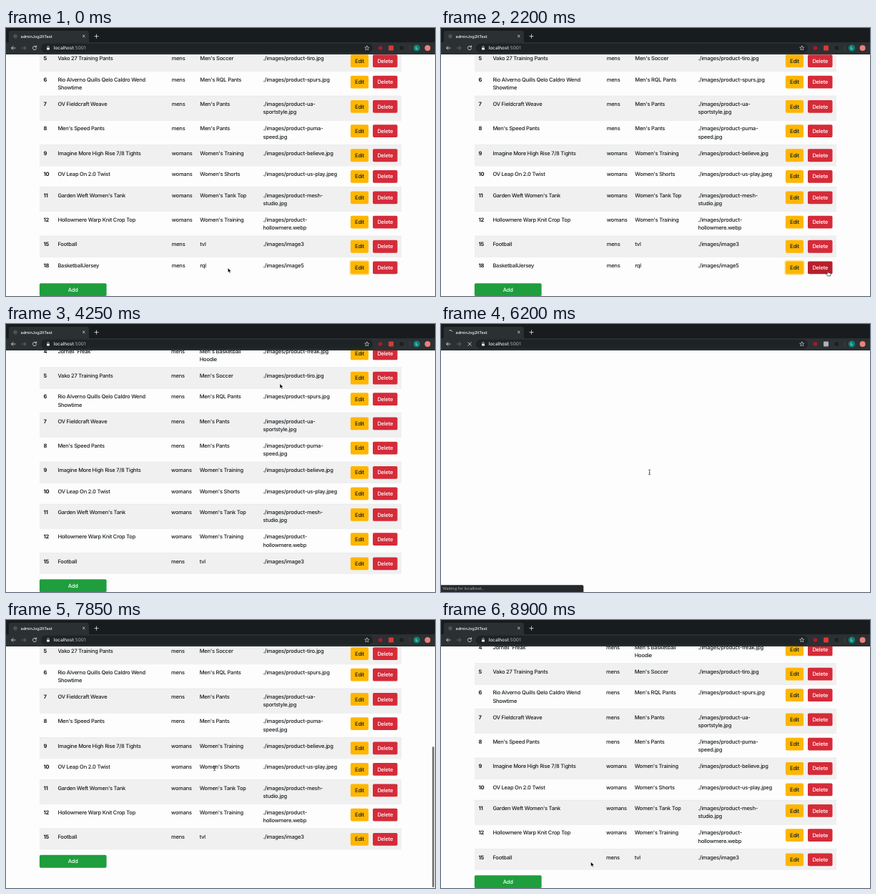
An HTML page that plays this animation: 600x375 px, repeating every 8.95 s.

```html
<!DOCTYPE html>
<html lang="en">
<head>
<meta charset="utf-8">
<title>adminJog2ItTest</title>
<style>
  html, body { margin: 0; width: 100%; height: 100%; overflow: hidden; background: #fdfdfd; }
  svg { display: block; width: 100%; height: 100%; }
  text { font: 450 7.5px Inter, "Open Sans", sans-serif; letter-spacing: -.21px; fill: #171b1e; text-rendering: geometricPrecision; white-space: pre; }
  .bold { font-weight: 700; }
  .mid { text-anchor: middle; }
  .light { fill: #fff; }
  .brand { font-size: 9.375px; letter-spacing: -.45px; }
  .title { font-size: 13.1px; font-weight: 500; letter-spacing: -.6px; }
  .tab { font-size: 5.6px; font-weight: 500; letter-spacing: -.03px; fill: #f1f2f3; }
  .url { font-size: 6.5px; letter-spacing: 0; fill: #e8eaeb; }
  .dim { fill: #94999c; }
  .wide .shift { transform: translate(.6px, 0); }
  .line { fill: none; stroke: #e4e6e7; stroke-width: .8; stroke-linecap: round; stroke-linejoin: round; }
</style>
</head>
<body>
<svg id="stage" viewBox="0 0 600 375" preserveAspectRatio="none"></svg>
<script>
// The page is a 1280 px wide layout shown at 600 px.
const SCALE = 600 / 1280, LOOP = 8950;
const TOP = 160.7, LEFT = 100 * SCALE, WIDTH = 1080 * SCALE;
const LINE = 24 * SCALE, SHORT = 63 * SCALE, TALL = 73 * SCALE, BUTTON = 38 * SCALE;
const FULL_END = 261.8, SHORT_END = FULL_END - SHORT;
const stage = document.getElementById('stage');

function add(parent, tag, attrs = {}, label) {
  const node = document.createElementNS('http://www.w3.org/2000/svg', tag);
  for (const key in attrs) node.setAttribute(key, attrs[key]);
  if (label !== undefined) node.textContent = label;
  parent.append(node);
  return node;
}
const group = parent => add(parent, 'g');
const rect = (parent, x, y, width, height, fill, rx = 0) => add(parent, 'rect', { x, y, width, height, fill, rx });
const text = (parent, x, y, label, cls = '') => add(parent, 'text', { x, y, class: cls }, label);
const circle = (parent, cx, cy, r, fill) => add(parent, 'circle', { cx, cy, r, fill });
const line = (parent, d) => add(parent, 'path', { d, class: 'line' });
const show = (node, on) => node.setAttribute('display', on ? 'inline' : 'none');
const move = (node, x, y) => node.setAttribute('transform', `translate(${x} ${y})`);

// Columns: id | product | type | category | image; "~" breaks a line.
const products = `1|Tavin Qelo Aro-VEN 'Friends'|mens|Men's Basketball T-~Shirt|product-tavin.jpg
2|Marvon Telds Qelo Aro-VEN 'MVP'|mens|Men's RQL T-Shirt|product-marvon.webp
3|KLL 'Overlooked' T-Shirt|mens|Men's Basketball T-~Shirt|product-hugh.png
4|Jornell 'Freak'|mens|Men's Basketball~Hoodie|product-freak.jpg
5|Vako 27 Training Pants|mens|Men's Soccer|product-tiro.jpg
6|Rio Alverno Quills Qelo Caldro Wend~Showtime|mens|Men's RQL Pants|product-spurs.jpg
7|OV Fieldcraft Weave|mens|Men's Pants|product-ua-~sportstyle.jpg
8|Men's Speed Pants|mens|Men's Pants|product-puma-~speed.jpg
9|Imagine More High Rise 7/8 Tights|womans|Women's Training|product-believe.jpg
10|OV Leap On 2.0 Twist|womans|Women's Shorts|product-us-play.jpeg
11|Garden Weft Women's Tank|womans|Women's Tank Top|product-mesh-~studio.jpg
12|Hollowmere Warp Knit Crop Top|womans|Women's Training|product-~hollowmere.webp
15|Football|mens|tvl|image3
18|BasketballJersey|mens|rql|image5`.split('\n');
const columns = [52.5, 72.4, 231.1, 270.7, 359.5];

function button(parent, x, y, width, fill, label, cls) {
  const box = rect(parent, x, y, width, BUTTON, fill, 4 * SCALE);
  text(parent, x + width / 2, y + 11.6, label, 'mid ' + cls);
  return box;
}

// Page
rect(stage, 0, 0, 600, 375, '#fdfdfd');
const page = group(stage);
rect(page, 0, 63, 600, .6, '#dfe1e3');
rect(page, 0, 63.6, 600, 1, '#f5f5f5');
text(page, 40, 53.3, 'adminJog2ItTest', 'brand');
[[407.8, 'Home'], [435.2, 'Counter'], [470.2, 'Fetch data'], [514, 'Add Product']]
  .forEach(([x, label]) => text(page, x, 53, label));
text(page, LEFT, 130.8, 'Admin', 'title');
rect(page, LEFT, 137.2, WIDTH, TOP - 137.2, '#2b2f35');
['Id', 'Product', 'Type', 'Category', 'Image'].forEach((label, i) => text(page, columns[i], 152, label, 'bold light'));
text(page, 514.5, 152, 'Actions', 'bold light mid');

let bottom = TOP, lastRow, lastDelete, lastTop;
products.forEach((entry, index) => {
  const row = group(page), height = entry.includes('~') ? TALL : SHORT;
  rect(row, LEFT, bottom, WIDTH, height, index % 2 ? '#fdfdfd' : '#f0f0f0');
  rect(row, LEFT, bottom, WIDTH, SCALE, '#dee1e4');
  entry.split('|').forEach((cell, i) => {
    const cls = i === 0 ? 'bold' : i === 2 || i === 3 ? 'shift' : '';
    (i === 4 ? './images/' + cell : cell).split('~')
      .forEach((part, n) => text(row, columns[i], bottom + 14.3 + n * LINE, part, cls));
  });
  const y = bottom + 13 * SCALE;
  if (index === products.length - 1)
    add(row, 'rect', { x: 481.2, y: y - .7, width: 26.5, height: BUTTON + 1.4, rx: 2.5, fill: 'none', stroke: '#fede8c', 'stroke-width': 1.5 });
  button(row, 481.9, y, 25.1, '#feb600', 'Edit', '');
  lastDelete = button(row, 513, y, 34.5, '#d52b39', 'Delete', 'light');
  lastRow = row;
  lastTop = bottom;
  bottom += height;
});
const addButton = group(page);
button(addButton, LEFT, 16 * SCALE, 200 * SCALE, '#1e9e3c', 'Add', 'light');

const thumb = rect(stage, 596, 174, 3, 199, '#7e7e7e', 1.5);
const blank = rect(stage, 0, 37, 600, 338, '#fdfdfd');
const status = group(stage);
add(status, 'path', { d: 'M0 365.3H197.5Q199.3 365.3 199.3 367V375H0Z', fill: '#25292b' });
text(status, 2.3, 372.3, 'Waiting for localhost...', 'tab dim');

// Browser frame
rect(stage, 0, 0, 600, 20.5, '#191c1e');
add(stage, 'path', { d: 'M2 20.5Q4 20.5 4 18V6.5Q4 3.7 7 3.7H113Q116 3.7 116 6.5V18Q116 20.5 118 20.5Z', fill: '#2b3032' });
rect(stage, 0, 20, 600, 17, '#2b3032');
rect(stage, 49, 21.7, 464, 13, '#1e2325', 6.5);
text(stage, 20.5, 13.7, 'adminJog2ItTest', 'tab');
line(stage, 'M107.4 10l2.8 2.8m0-2.8l-2.8 2.8M123.9 11.6h5.2m-2.6-2.6v5.2');
line(stage, 'M13 28H7.6m2.5-2.6L7.5 28l2.6 2.6');
line(stage, 'M22.3 28h5.4m-2.5-2.6l2.6 2.6-2.6 2.6').style.stroke = '#73797c';
const reload = line(stage, 'M42.2 26.2A2.7 2.7 0 1 0 42.7 28.7M42.6 24.8v2h-2');
const stop = line(stage, 'M37.8 25.7l4.6 4.6m0-4.6l-4.6 4.6');
rect(stage, 57, 27.4, 4, 3.2, '#e4e6e7', .4);
line(stage, 'M57.9 27.2v-.8a1.1 1.1 0 0 1 2.2 0v.8').style.strokeWidth = .6;
const address = text(stage, 66.5, 30.3, 'localhost', 'url');
add(address, 'tspan', { class: 'dim' }, ':5001');
line(stage, 'M504.8 25l.9 2 2.2.2-1.7 1.5.5 2.2-1.9-1.2-1.9 1.2.5-2.2-1.7-1.5 2.2-.2z').style.strokeWidth = .6;
circle(stage, 523.5, 28, 2.8, '#b0182a');
const extension = rect(stage, 535, 24.5, 7, 7, '#d83a35', 1);
circle(stage, 553.3, 28, 2.7, '#1b1f21');
rect(stage, 564, 24, .6, 8, '#474d50');
circle(stage, 574.5, 28, 4.6, '#07877a');
text(stage, 574.5, 30, 'L', 'tab mid');
circle(stage, 589.6, 28, 4, '#ee8078');
const favicon = group(stage);
circle(favicon, 13, 11.6, 2.8, '#4c5255');
const spinner = line(stage, 'M0-3A3 3 0 0 1 3 0');

// Pointers
const pointers = {
  arrow: add(stage, 'path', { d: 'M0 0V6.4L1.5 5.1 2.5 7.4 3.7 6.9 2.7 4.7H4.7Z', fill: '#000', stroke: '#fff', 'stroke-width': .5 }),
  hand: add(stage, 'path', { d: 'M-.7-1.2Q0-2 .6-1.2V1.2L3.6 1.9Q4.3 2.2 4.1 3.3L3.5 6H-.2L-2.2 3.3Q-2.2 2.4-1.4 2.6L-.7 3.2Z', fill: '#fff', stroke: '#000', 'stroke-width': .6 }),
  beam: add(stage, 'path', { d: 'M-1.5-3.4Q0-3.4 0-2.5 0-3.4 1.5-3.4M0-2.5V2.5M-1.5 3.4Q0 3.4 0 2.5 0 3.4 1.5 3.4M-.7.9H.7', fill: 'none', stroke: '#222', 'stroke-width': .7 })
};

const pointerPath = [
  [0, 310.3, 335.7], [1200, 310.3, 335.7], [1950, 541, 341], [2700, 541, 341], [3700, 383, 83.6],
  [4500, 383, 83.6], [5250, 291.6, 207.4], [8250, 291.6, 207.4], [8780, 209.5, 338.4]
];
const scrollPath = [[7200, 0], [7780, SHORT_END + 31], [7850, SHORT_END + 28.5], [8300, SHORT_END]];

const smooth = p => p * p * (3 - 2 * p);
function sample(keys, t, axis = 1) {
  const next = keys.findIndex(key => key[0] > t);
  if (next < 0) return keys[keys.length - 1][axis];
  if (next === 0) return keys[0][axis];
  const a = keys[next - 1], b = keys[next];
  return a[axis] + (b[axis] - a[axis]) * smooth((t - a[0]) / (b[0] - a[0]));
}

function draw(t) {
  const deleted = t >= 4150, loading = t >= 5600 && t < 6800;
  const scroll = !deleted ? FULL_END : t < 6000 ? SHORT_END : sample(scrollPath, t);
  move(page, 0, -scroll);
  page.setAttribute('class', deleted ? '' : 'wide');
  show(lastRow, !deleted);
  move(addButton, 0, deleted ? lastTop : bottom);

  show(blank, t >= 5950 && t < 6800);
  show(status, loading);
  show(stop, loading);
  show(reload, !loading);
  show(spinner, loading);
  show(favicon, !loading);
  spinner.setAttribute('transform', `translate(13 11.6) rotate(${(t - 6200) * .36 - 25})`);
  extension.setAttribute('fill', t >= 5950 && t < 7400 ? '#aeb3b5' : '#d83a35');

  show(thumb, t >= 7220 && t < 8650);
  const over = Math.max(0, scroll - SHORT_END);
  thumb.setAttribute('y', 37 + Math.min(scroll, SHORT_END) * .594 + over * .07);
  thumb.setAttribute('height', 199 - over * .07);
  thumb.setAttribute('opacity', 1 - Math.max(0, Math.min(1, (t - 8450) / 200)));

  const x = sample(pointerPath, t, 1), y = sample(pointerPath, t, 2);
  const hover = !deleted && x > 513 && x < 547.5 && y > 326 && y < 345;
  lastDelete.setAttribute('fill', hover ? '#b71f2b' : '#d52b39');
  const kind = hover ? 'hand' : t >= 5200 && t < 8320 ? 'beam' : 'arrow';
  for (const name in pointers) show(pointers[name], name === kind);
  move(pointers[kind], x, y);
}

const start = performance.now();
function tick() {
  draw((performance.now() - start) % LOOP);
  requestAnimationFrame(tick);
}
draw(0);
requestAnimationFrame(tick);
</script>
</body>
</html>
```
